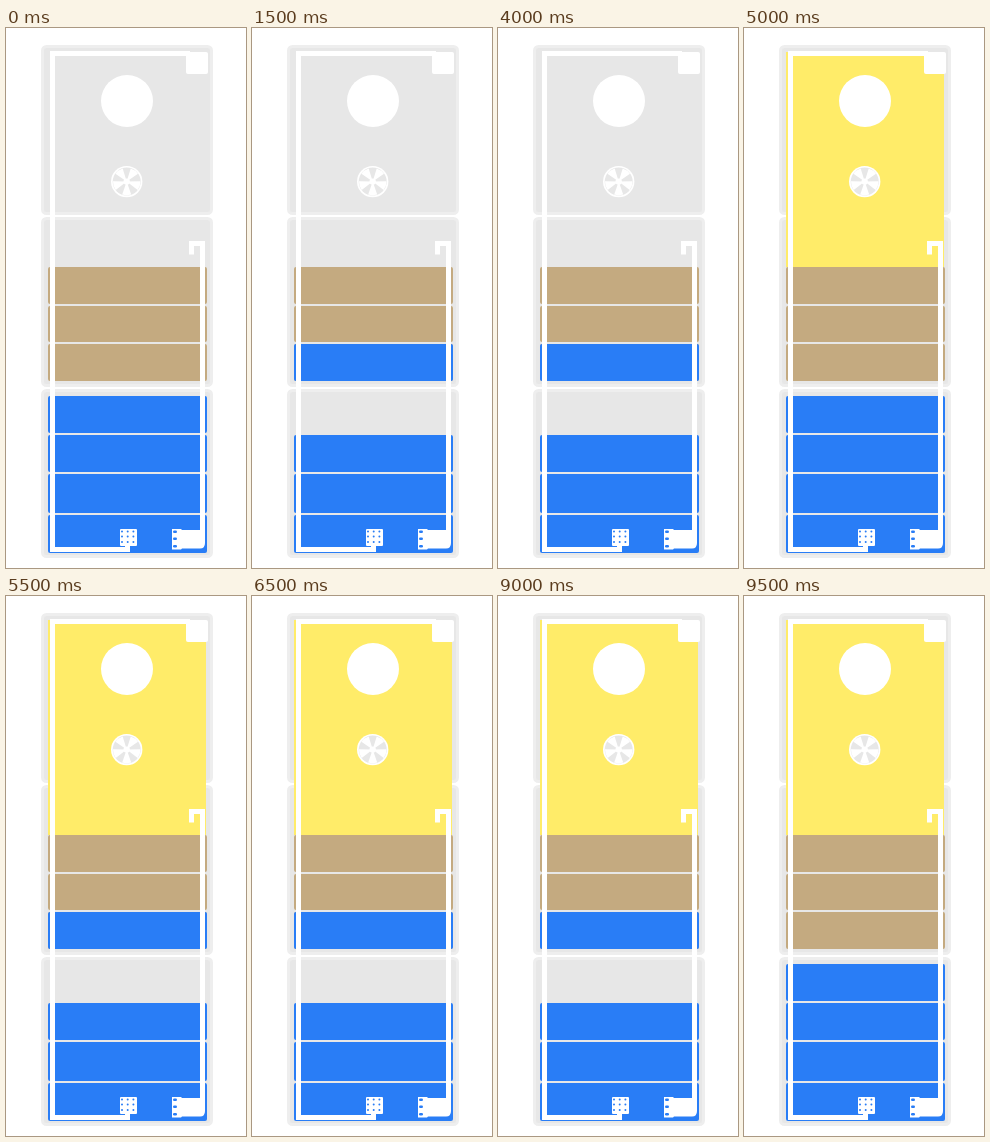
An HTML page that plays this animation: 240 by 540 pixels, repeating every 10000 ms.

```html
<!DOCTYPE html>
<html lang="en">
<head>
<meta charset="utf-8">
<title>Ebb and flow</title>
<style>
  html, body { margin: 0; width: 100%; height: 100%; overflow: hidden; background: #fff; }
  svg { display: block; width: 240px; height: 540px; }
  .panel { fill: #e7e7e7; stroke: #eee; stroke-width: 3; }
  .soil { fill: #c4aa80; }
  .water { fill: #297df6; }
  .white { fill: #fff; }
  .pipe { fill: none; stroke: #fff; stroke-width: 5; }
  .light { fill: #ffec69; animation: light 10s step-end infinite; }
  .low { animation: low 2.5s step-end infinite; }
  .high { animation: high 2.5s step-end infinite; }
  .drain { animation-direction: normal; }
  .low.drain { animation-name: low-drain; }
  .high.drain { animation-name: high-drain; }
  @keyframes light { 0% { opacity: 0 } 50%, 100% { opacity: 1 } }
  @keyframes low { 0% { opacity: 0 } 20% { opacity: 1 } 80%, 100% { opacity: 0 } }
  @keyframes high { 0% { opacity: 0 } 40% { opacity: 1 } 60%, 100% { opacity: 0 } }
  @keyframes low-drain { 0% { opacity: 1 } 20% { opacity: 0 } 80%, 100% { opacity: 1 } }
  @keyframes high-drain { 0% { opacity: 1 } 40% { opacity: 0 } 60%, 100% { opacity: 1 } }
</style>
</head>
<body>
<svg viewBox="0 0 240 540">
  <defs>
    <path id="blade" d="M0 0 L13 -4.5 A13.8 13.8 0 0 1 13 4.5 Z"/>
  </defs>

  <g class="panel">
    <rect x="36.5" y="18.5" width="169" height="167" rx="4"/>
    <rect x="36.5" y="190.5" width="169" height="167" rx="4"/>
    <rect x="36.5" y="362.5" width="169" height="166" rx="4"/>
  </g>

  <rect class="light" x="42" y="24" width="158" height="215"/>

  <g class="soil">
    <rect x="42" y="239" width="159" height="37" rx="2"/>
    <rect x="42" y="278" width="159" height="36" rx="2"/>
    <rect x="42" y="316" width="159" height="37" rx="2"/>
  </g>
  <g class="water">
    <rect class="high" x="42" y="278" width="159" height="36" rx="2"/>
    <rect class="low" x="42" y="316" width="159" height="37" rx="2"/>
    <rect class="low drain" x="42" y="368" width="159" height="37" rx="2"/>
    <rect class="high drain" x="42" y="407" width="159" height="37" rx="2"/>
    <rect x="42" y="446" width="159" height="39" rx="2"/>
    <rect x="42" y="487" width="159" height="38" rx="2"/>
  </g>

  <!-- lamp and fan -->
  <circle class="white" cx="121" cy="73" r="26"/>
  <g transform="translate(120.7 153.6)">
    <circle class="white" r="15.7"/>
    <circle r="14" fill="#e7e7e7"/>
    <g class="white">
      <use href="#blade" transform="rotate(18)"/>
      <use href="#blade" transform="rotate(90)"/>
      <use href="#blade" transform="rotate(162)"/>
      <use href="#blade" transform="rotate(234)"/>
      <use href="#blade" transform="rotate(306)"/>
      <circle r="3.2"/>
    </g>
  </g>

  <!-- plumbing -->
  <path class="pipe" d="M184 25.5 H46.5 V521.5 H121.5 V515"/>
  <path class="pipe" d="M185.5 226.5 V215.5 H196.5 V510"/>
  <rect class="white" x="180" y="24" width="22" height="22" rx="2"/>

  <!-- air stone -->
  <rect class="white" x="114" y="501" width="17" height="17" rx="1"/>
  <path d="M116 503.5 H128 M116 508.5 H128 M116 514 H128" fill="none" stroke="#297df6"
        stroke-width="2" stroke-linecap="round" stroke-dasharray="0 5.7"/>

  <!-- pump -->
  <path class="white" d="M166 501 H175 L176 502 H199 V515 Q199 520.5 194 520.5 H176 L175 521.5 H166 Z"/>
  <g class="water">
    <rect x="167" y="502.5" width="4" height="2.5" rx="1.2"/>
    <rect x="167" y="509.5" width="4" height="2.5" rx="1.2"/>
    <rect x="167" y="517" width="4" height="2.5" rx="1.2"/>
  </g>
</svg>
</body>
</html>
```
